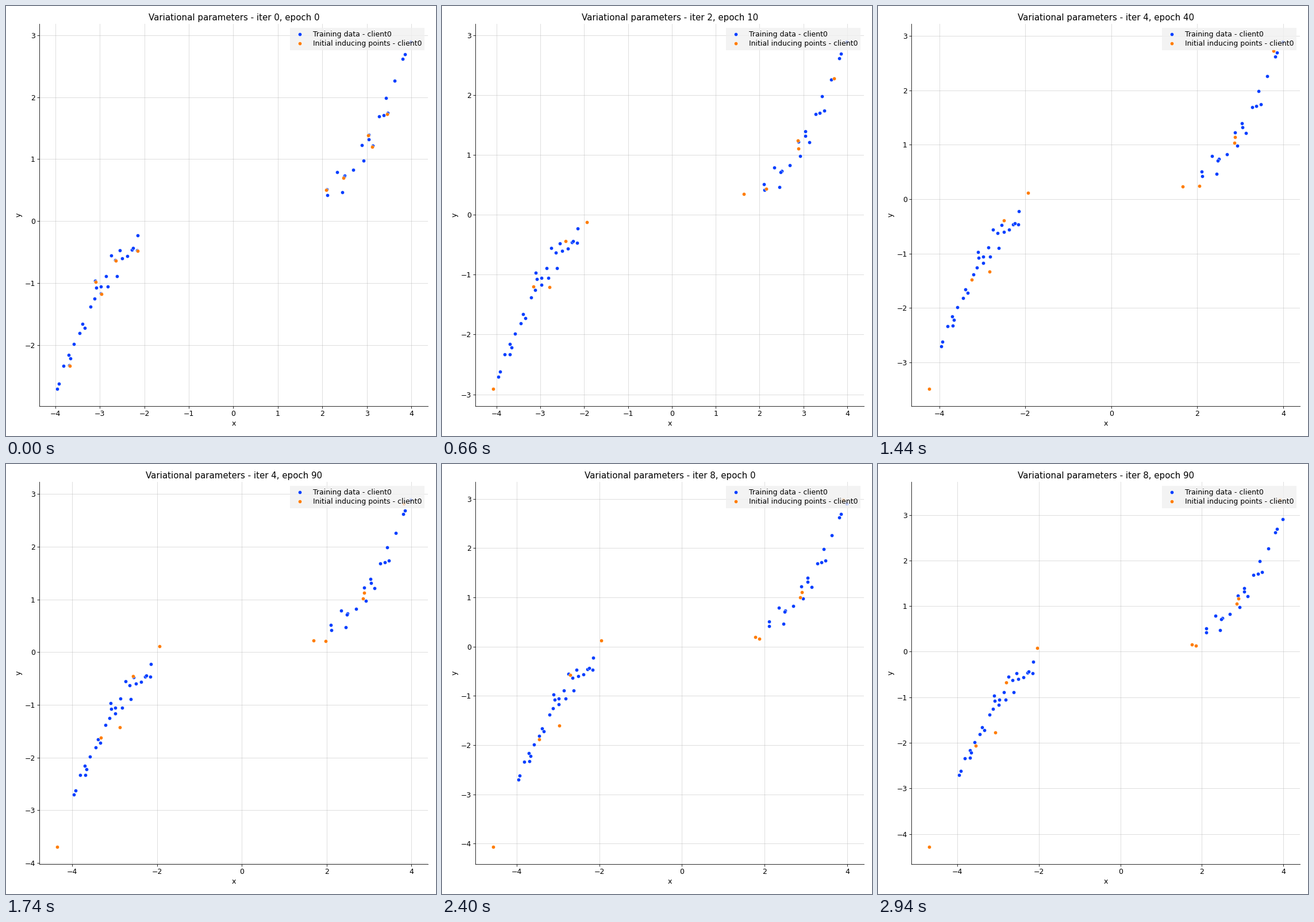
Recreate the animation shown at these times as a matplotlib script. Size 748 by 748 pixels, loop 3000 ms.

```python
import numpy as np
import matplotlib.pyplot as plt
from matplotlib.animation import FuncAnimation

SIZE, DPI = 748, 74.8
FRAMES, INTERVAL = 50, 60
BLUE, ORANGE = "#023eff", "#ff7c00"

plt.rcParams.update({
    "font.family": "DejaVu Sans",
    "font.size": 12,
    "axes.spines.top": False,
    "axes.spines.right": False,
    "axes.axisbelow": True,
})

# Waypoints of each inducing point: start, after local fitting, before the last round.
TRACKS = np.array([
    [(-3.68, -2.34), (-4.11, -3.26), (-4.57, -4.06)],
    [(-3.09, -0.98), (-3.17, -1.33), (-3.45, -1.88)],
    [(-2.97, -1.18), (-2.78, -1.23), (-2.97, -1.60)],
    [(-2.64, -0.64), (-2.41, -0.32), (-2.71, -0.58)],
    [(-2.15, -0.48), (-1.93, 0.11), (-1.96, 0.12)],
    [(2.09, 0.50), (1.61, 0.25), (1.77, 0.19)],
    [(2.47, 0.70), (2.12, 0.27), (1.87, 0.16)],
    [(3.03, 1.38), (2.86, 1.16), (2.90, 1.10)],
    [(3.12, 1.20), (2.86, 1.05), (2.86, 1.00)],
    [(3.46, 1.73), (3.72, 2.62), (3.90, 2.99)],
])
STEPS = [0, 19, 40, 49]
EASE = [(3, 1.1), (1.2, 1.2), (1, 1)]  # ease-out power in x and y per leg


def last_round(pos):
    """Final update: bends the outer points further away from the middle."""
    x, y = pos.T
    return pos + np.column_stack([-0.05 + 0.017 * x,
                                  -0.05 + 0.095 * y + 0.0132 * y**2])


POSES = [*TRACKS.swapaxes(0, 1), last_round(TRACKS[:, 2])]


def inducing(step):
    leg = min(np.searchsorted(STEPS, step, side="right") - 1, len(EASE) - 1)
    t = (step - STEPS[leg]) / (STEPS[leg + 1] - STEPS[leg])
    eased = 1 - (1 - t) ** np.array(EASE[leg])
    return POSES[leg] + (POSES[leg + 1] - POSES[leg]) * eased


def clumped(start, stop, count, centre, period, pull):
    x = np.linspace(start, stop, count)
    return x - pull * np.sin(2 * np.pi * (x - centre) / period)


def training_data():
    """Noisy odd curve in two clusters, plus the data the inducing points start on."""
    rng = np.random.default_rng(4)
    x = np.concatenate([clumped(-3.98, -2.14, 23, -3.67, 0.28, 0.03),
                        clumped(2.16, 4.02, 15, 3.38, 0.46, 0.06)])
    u = np.abs(x) - 3
    noise = 0.1 * np.sqrt(np.clip(1 - u, 0, None)) * rng.standard_normal(x.size)
    y = 0.09 + np.sign(x) * (1.2 + 1.29 * u + 0.37 * u**2) + noise
    starts = POSES[0] + np.column_stack([0.012 * np.sign(POSES[0][:, 0]),
                                         np.full(len(TRACKS), 0.012)])
    return np.vstack([np.column_stack([x, y]), starts])


TRAIN = training_data()

fig = plt.figure(figsize=(SIZE / DPI, SIZE / DPI), dpi=DPI, facecolor="white")
left, right, top, bottom = 58.2, 734.4, 31.3, 695.8
ax = fig.add_axes([left / SIZE, 1 - bottom / SIZE,
                   (right - left) / SIZE, (bottom - top) / SIZE])
ax.grid(color="#b0b0b0", alpha=0.5, linewidth=0.8)
ax.set_xlabel("x")
ax.set_ylabel("y")

dots = dict(s=36, edgecolors="white", linewidths=0.48, zorder=3)
ax.scatter(*TRAIN.T, color=BLUE, label="Training data - client0", **dots)
points = ax.scatter(*inducing(0).T, color=ORANGE,
                    label="Initial inducing points - client0", **dots)
ax.legend(loc="upper right", labelspacing=0.25, fancybox=False,
          facecolor="#f0f0f0", edgecolor="none", framealpha=0.8)
title = ax.set_title("")


def update(step):
    pos = inducing(step)
    points.set_offsets(pos)
    everything = np.vstack([TRAIN, pos])
    lo, hi = everything.min(axis=0), everything.max(axis=0)
    pad = 0.05 * (hi - lo)
    ax.set_xlim(lo[0] - pad[0], hi[0] + pad[0])
    ax.set_ylim(lo[1] - pad[1], hi[1] + pad[1])
    rounds, tenth = divmod(step, 10)
    title.set_text(f"Variational parameters - iter {2 * rounds}, epoch {10 * tenth}")
    return points, title


anim = FuncAnimation(fig, update, frames=FRAMES, init_func=lambda: update(0),
                     interval=INTERVAL, repeat=True, repeat_delay=0)
plt.show()
```
